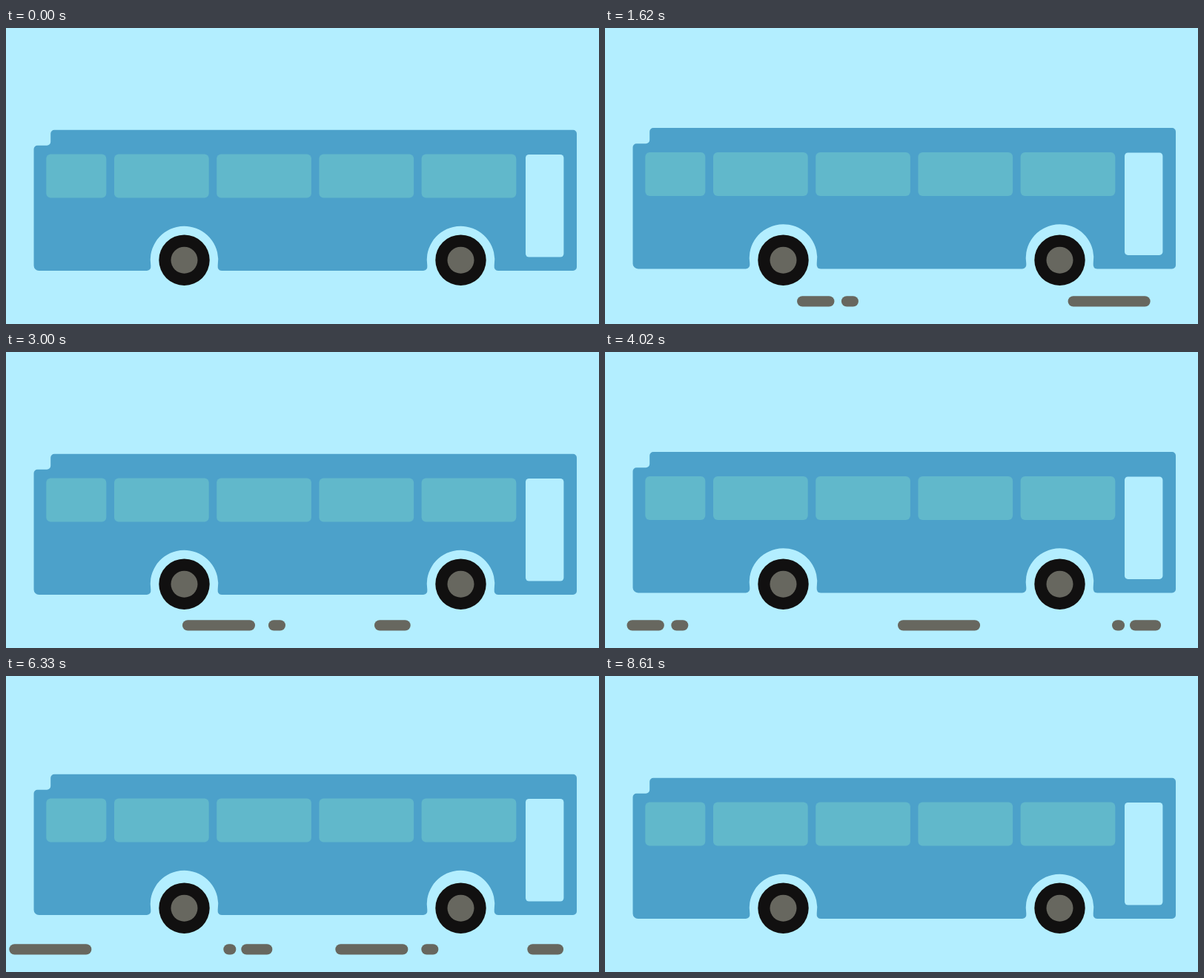
These frames come from a looping animation (800 px wide and 400 px high, 8.67 s). An HTML page with a canvas:

```html
<!DOCTYPE html>
<html lang="en">
<head>
<meta charset="utf-8">
<title>Bus ride</title>
<style>
html, body { margin: 0; width: 100%; height: 100%; overflow: hidden; background: #b3eeff; }
canvas { display: block; width: 800px; height: 400px; }
</style>
</head>
<body>
<canvas id="stage" width="800" height="400"></canvas>
<script>
const ctx = document.getElementById('stage').getContext('2d');
const SKY = '#b3eeff', BODY = '#4ca1ca', GLASS = '#61b8cb', TYRE = '#111010', GREY = '#67675f';
const LOOP = 8670, STEP = 30, LAST = 287;
const SPEED = 22.97;   // road pixels per step
const STRETCH = 1378;  // length of one stretch of road marks
const AXLES = [240.5, 613.5], AXLE_Y = 313.7;

function box(x, y, w, h, r, color) {
  ctx.fillStyle = color;
  ctx.beginPath();
  ctx.roundRect(x, y, w, h, r);
  ctx.fill();
}

function disc(x, y, r, color) {
  ctx.fillStyle = color;
  ctx.beginPath();
  ctx.arc(x, y, r, 0, Math.PI * 2);
  ctx.fill();
}

// Rises from start to peak, sinks back by end
function hop(p, start, peak, end) {
  return 5 * Math.max(0, Math.min((p - start) / (peak - start), (end - p) / (end - peak)));
}

function lift(n) {
  const p = n % 20;
  return hop(p, 0, 2.5, 7) + hop(p, 8, 11, 17.25);
}

function mark(x, length) {
  box(x, 362.2, length, 14.4, 7.2, GREY);
}

function pair(x, first, gap, second) {
  mark(x, first);
  mark(x + first + gap, second);
}

function drawStretch(x) {
  pair(x, 98, 18, 23);
  mark(x + 259, 48.7);
  pair(x + 572.5, 50.3, 9.5, 23);
  mark(x + 938, 111);
  pair(x + 1227, 17, 7, 42);
}

function drawRoad(n) {
  for (let k = 0; k < 4; k++) {
    const lead = k ? 0 : 230;  // the first stretch arrives early
    drawStretch(1157 - lead + k * STRETCH - SPEED * n);
  }
}

function arch(cx) {
  const a = 0.164;
  ctx.lineTo(cx + 50.5, 328);
  ctx.quadraticCurveTo(cx + 44.5, 327.5, cx + 45.2, 321);
  ctx.arc(cx, 313.6, 45.8, a, Math.PI - a, true);
  ctx.quadraticCurveTo(cx - 44.5, 327.5, cx - 50.5, 328);
}

function drawBody() {
  ctx.fillStyle = BODY;
  ctx.beginPath();
  ctx.moveTo(65, 137.7);
  ctx.arcTo(770, 137.7, 770, 328, 5);
  ctx.arcTo(770, 328, 700, 328, 5);
  arch(AXLES[1]);
  arch(AXLES[0]);
  ctx.arcTo(37.5, 328, 37.5, 250, 7);
  ctx.arcTo(37.5, 158.8, 50, 158.8, 5);
  ctx.arcTo(60.2, 158.8, 60.2, 140, 5);
  ctx.arcTo(60.2, 137.7, 70, 137.7, 5);
  ctx.closePath();
  ctx.fill();

  box(54.3, 170.6, 81, 59, 6, GLASS);
  for (let i = 0; i < 4; i++) box(146 + i * 138.2, 170.6, 127.7, 59, 6, GLASS);
  box(701, 171, 51.4, 138.5, 4.5, SKY);
}

function draw(n) {
  ctx.fillStyle = SKY;
  ctx.fillRect(0, 0, 800, 400);
  drawRoad(n);

  ctx.save();
  ctx.translate(0, -lift(n));
  drawBody();
  ctx.restore();

  for (const x of AXLES) {
    disc(x, AXLE_Y, 34.2, TYRE);
    disc(x, AXLE_Y, 18, GREY);
  }
}

const begin = performance.now();
function tick() {
  const t = (performance.now() - begin) % LOOP;
  draw(Math.min(LAST, Math.floor(t / STEP)));
  requestAnimationFrame(tick);
}
tick();
</script>
</body>
</html>
```
